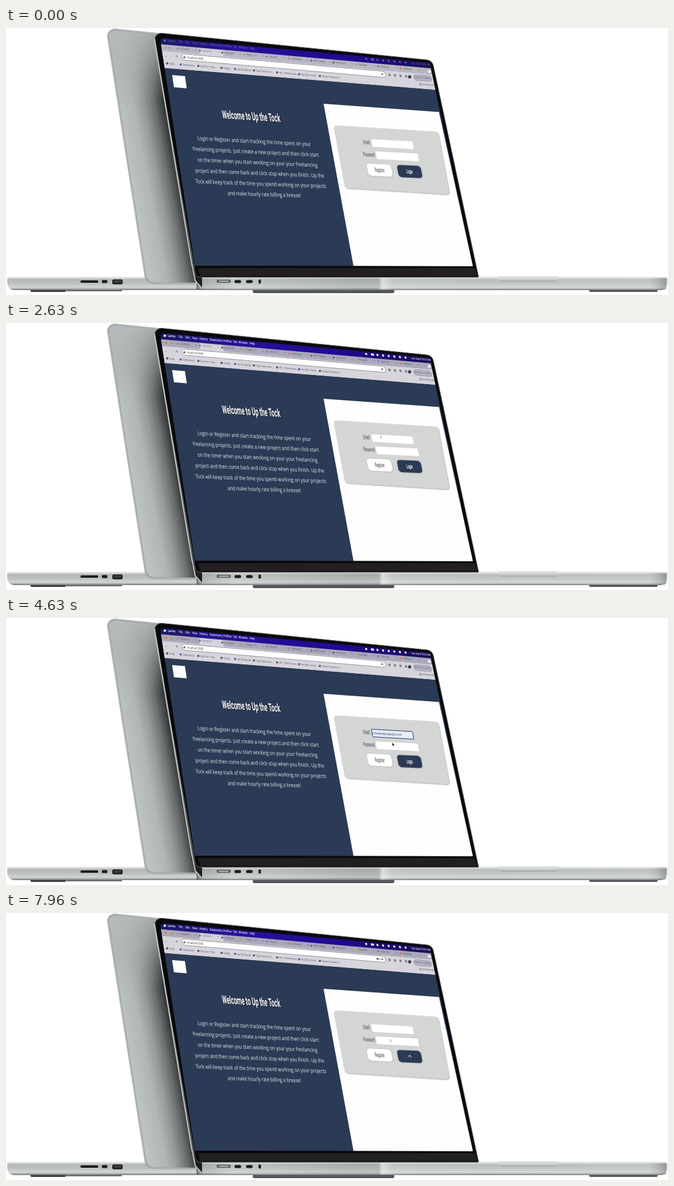
An HTML page with a canvas for the animation above (8000 ms loop, 1084 by 437 pixels).

```html
<!DOCTYPE html>
<html lang="en">
<head>
<meta charset="utf-8">
<title>Laptop login demo</title>
<style>
html, body { margin: 0; width: 100%; height: 100%; overflow: hidden; background: #fff; }
canvas { display: block; width: 1084px; height: 437px; }
</style>
</head>
<body>
<canvas id="stage" width="1084" height="437"></canvas>
<script>
const c = document.getElementById('stage').getContext('2d');
const LOOP = 8000;
const NAVY = '#2b3a55';
const SANS = '"Open Sans", "Noto Sans", sans-serif';
const HEAD = 'Roboto, "Liberation Sans", sans-serif';
const MAIL = 'tolvedev@example.com';

// Screen perspective: rows meet at a far point, columns lean with x.
const VX = 4450, VY = 402, SQUEEZE = 0.75;
const slope = (x, y) => (VY - y) / (VX - x);
const lean = x => 0.154 + (x - 300) * 0.00013;
const leftX = y => 252 + (y - 17) * 0.1535;
const rightX = y => 694 + (y - 58) * 0.2135;
const rowY = (row, x) => row + (VY - row) * (x - leftX(row)) / (VX - leftX(row));

function at(x, y, draw) {
  c.save();
  c.transform(1, slope(x, y), lean(x), 1, x, y);
  draw();
  c.restore();
}

function text(s, x, y, size, o = {}) {
  at(x, y, () => {
    c.scale(SQUEEZE * (o.narrow || 1), 1);
    c.font = `${o.weight || 400} ${size}px ${o.font || SANS}`;
    c.textAlign = o.align || 'left';
    c.textBaseline = 'middle';
    c.fillStyle = o.color || '#fff';
    c.fillText(s, 0, 0);
  });
}

function box(x, y, w, h, r, fill, stroke, line = 1) {
  at(x, y, () => {
    c.beginPath();
    c.roundRect(0, 0, w, h, r);
    if (fill) { c.fillStyle = fill; c.fill(); }
    if (stroke) {
      c.shadowColor = 'transparent';
      c.strokeStyle = stroke;
      c.lineWidth = line;
      c.stroke();
    }
  });
}

function dot(x, y, r, fill) {
  c.beginPath();
  c.arc(x, y, r, 0, 7);
  c.fillStyle = fill;
  c.fill();
}

function trace(points) {
  c.beginPath();
  points.forEach(([x, y]) => c.lineTo(x, y));
}

function poly(points, fill) {
  trace(points);
  c.closePath();
  c.fillStyle = fill;
  c.fill();
}

function line(points, color, width) {
  trace(points);
  c.strokeStyle = color;
  c.lineWidth = width;
  c.stroke();
}

function shadow(alpha, blur, offset) {
  c.shadowColor = `rgba(0,0,0,${alpha})`;
  c.shadowBlur = blur;
  c.shadowOffsetX = c.shadowOffsetY = offset;
}

// Closed outline with rounded corners; each point is [x, y, radius].
function rounded(points) {
  const n = points.length, [a, b] = [points[n - 1], points[0]];
  c.beginPath();
  c.moveTo((a[0] + b[0]) / 2, (a[1] + b[1]) / 2);
  points.forEach(([x, y, r], i) => {
    const q = points[(i + 1) % n];
    c.arcTo(x, y, (x + q[0]) / 2, (y + q[1]) / 2, r);
  });
  c.closePath();
}

function gradient(x0, y0, x1, y1, ...stops) {
  const g = c.createLinearGradient(x0, y0, x1, y1);
  stops.forEach(([p, color]) => g.addColorStop(p, color));
  return g;
}

function band(a, b, fill) {
  const ra = rowY(a, rightX(a + 38)), rb = rowY(b, rightX(b + 34));
  poly([[leftX(a), a], [rightX(ra), ra], [rightX(rb), rb], [leftX(b), b]], fill);
}

function slot(x, y, w, h, r = 1.5, fill = '#1c1d1e') {
  c.beginPath();
  c.roundRect(x, y, w, h, r);
  c.fillStyle = fill;
  c.fill();
}

function base(x0, x1, leftR, rightR) {
  c.beginPath();
  c.roundRect(x0, 407.5, x1 - x0, 21.5, [2, 2, rightR, leftR]);
  c.fillStyle = gradient(0, 407.5, 0, 429, [0, '#d4d7d7'], [0.07, '#e2e4e4'], [0.18, '#b3b7b8'],
    [0.5, '#bdc1c1'], [0.78, '#d3d6d5'], [0.9, '#a9adad'], [1, '#6b6e6e']);
  c.fill();
}

function backLaptop() {
  slot(40, 428, 58, 4, 2, '#3c3d3d');
  slot(98, 428, 92, 3, 1.5, '#6b6d6d');
  base(2, 325, 12, 0);
  slot(122, 413, 29, 4);
  slot(157, 412.5, 9, 5);
  slot(174, 411.5, 17, 8, 2.5);
  slot(176, 413, 13, 4, 1, '#3a3c3e');

  rounded([[165, 1, 11], [252, 10, 2], [322, 418, 4], [230, 417, 14]]);
  c.fillStyle = gradient(200, 220, 284, 204, [0, '#bdc2c3'], [0.3, '#b0b5b6'],
    [0.5, '#979b9c'], [0.7, '#6b6e6f'], [0.87, '#37393a'], [1, '#171818']);
  c.fill();
  c.fillStyle = gradient(215, 5, 238, 125, [0, 'rgba(181,186,187,.95)'], [0.4, 'rgba(176,181,182,.7)'],
    [1, 'rgba(170,175,176,0)']);
  c.fill();
  c.strokeStyle = '#858989';
  c.lineWidth = 2.5;
  c.stroke();
  c.strokeStyle = '#d3d6d6';
  c.lineWidth = 1;
  c.stroke();
}

function frontLaptop() {
  slot(404, 428, 232, 6, 3, '#55585a');
  slot(955, 428, 112, 4, 2, '#55585a');
  base(311, 1083, 8, 10);
  c.fillStyle = gradient(311, 0, 1083, 0, [0, 'rgba(20,20,20,.6)'], [0.015, 'rgba(110,112,112,.2)'],
    [0.08, 'rgba(225,228,228,.2)'], [0.34, 'rgba(120,123,122,.2)'], [0.385, 'rgba(120,123,122,.2)'],
    [0.395, 'rgba(255,255,255,.5)'], [0.42, 'rgba(235,237,236,.2)'], [0.6, 'rgba(235,237,236,.1)'],
    [0.96, 'rgba(230,232,231,.2)'], [1, 'rgba(90,92,92,.45)']);
  c.fillRect(312, 409, 769, 19);
  c.beginPath();
  c.roundRect(806, 406, 98, 9, [0, 0, 6, 6]);
  c.fillStyle = gradient(0, 407, 0, 415, [0, '#e2e4e4'], [0.7, '#c3c7c7'], [1, '#999d9d']);
  c.fill();
  slot(345, 412, 23, 5, 2, '#55585a');
  slot(348, 413.5, 17, 2, 1, '#b9bcbd');
  slot(374, 412.5, 11, 5, 2.5);
  slot(393, 412.5, 11, 5, 2.5);
  slot(413.5, 411.5, 4, 7, 2);

  poly([[303, 391], [309, 394], [321, 408], [321, 424], [313, 420]], '#1d1e1f');
  rounded([[241, 7, 11], [698, 53, 12], [774, 408, 1], [311, 408, 8]]);
  c.fillStyle = '#0a0a0b';
  c.fill();
  c.strokeStyle = '#6d7071';
  c.lineWidth = 1;
  c.stroke();
  poly([[314, 393], [768, 393], [772, 406], [318, 406]], '#211f1f');
  line([[243, 17], [304, 385], [310, 414], [319, 424]], '#c3c7c7', 2);
}

const MENUS = [['Lantra', 265], ['File', 283], ['Edit', 294], ['View', 305], ['History', 317],
  ['Bookmarks', 334], ['Profiles', 356], ['Tab', 372], ['Window', 381], ['Help', 399]];
const TABS = ['Creative B', 'Up The To', 'Local port', 'Page 2 - H', 'Server fil', 'Dashboard',
  'MVP_Design', 'Free fonts', 'Site build', 'Tutor stu', 'Database'];
const MARKS = [['Study', 263], ['Destinations', 285], ['My Drive - Files...', 314], ['Coding', 352],
  ['Job Site Boards', 374], ['Type Sheet Conv...', 405], ['API | Performance...', 443],
  ['Pay Bills Council', 479], ['Avatar Generator II', 513]];
const ICONS = ['#d36a55', '#5b56a8', '#4a4d57', '#cf9a4a', '#5878c9'];

function browser(active, key) {
  band(16, 27, gradient(252, 0, 695, 0, [0, '#1d1a68'], [0.3, '#26129a'], [0.65, '#1f0a94'], [1, '#191056']));
  c.globalAlpha = active ? 1 : 0.32;
  dot(260, rowY(20, 260), 2, '#fff');
  MENUS.forEach(([s, x], i) => text(s, x, rowY(20, x), 5, { weight: i ? 600 : 700 }));
  for (let i = 0; i < 8; i++) {
    const x = 588 + i * 9.2;
    box(x, rowY(20, x) - 1.7, i === 1 ? 5 : 3, 3.4, 1, '#fff');
  }
  text('Sun Sep 8 10:21 AM', 664, rowY(20.5, 664), 4.5, { weight: 600 });
  c.globalAlpha = 1;

  band(26.5, 38, active ? '#aaa8ba' : '#b7b6c2');
  ['#e2645c', '#e3b14c', '#60b35b'].forEach((color, i) =>
    dot(262 + i * 4.7, rowY(31.5, 262 + i * 4.7), 1.5, active ? color : '#a2a1ae'));
  box(316, rowY(27.5, 316), 39, 10.5, [3, 3, 0, 0], '#d6d4dd');
  TABS.forEach((s, i) => {
    const x = 281 + i * 36.5, y = rowY(31.5, x);
    dot(x, y, 1.5, ICONS[i % 5]);
    text(s, x + 4, y + 0.3, 4.4, { color: '#52525e' });
    text('×', x + 29, rowY(31.5, x + 29), 5, { color: '#555460' });
  });
  dot(693, 71, 2.6, '#ecebf0');

  band(37.5, 66, '#d6d5dc');
  ['←', '→', '⟳'].forEach((s, i) => text(s, 260 + i * 9, rowY(45, 260 + i * 9), 6, { color: i === 1 ? '#aaa' : '#555' }));
  box(287, rowY(39.5, 287), 334, 10, 5, '#fff', '#77767f', 0.7);
  dot(292, rowY(45, 292), 1.8, '#64646c');
  text('localhost:3000', 297, rowY(45.2, 297), 5.2, { color: '#333' });
  dot(616, rowY(45, 616), 1.4, '#66666e');
  if (key) {
    dot(608, rowY(45, 608), 1.4, '#44444c');
    box(609, rowY(44.6, 609), 3.5, 1, 0, '#44444c');
  }
  for (let i = 0; i < 4; i++) box(626 + i * 9, rowY(43, 626 + i * 9), 3.2, 4, 1, '#77767f');
  dot(661, rowY(45.5, 661), 2.6, '#353a44');
  box(667, rowY(40.5, 667), 29, 9.5, 4, '#b5b0c4', '#908a9f', 0.6);
  text('Relaunch to update', 669, rowY(45.2, 669), 3.7, { color: '#55505f' });
  MARKS.forEach(([s, x], i) => {
    dot(x + 1, rowY(57.5, x), 1.8, i % 3 === 1 ? '#564fb5' : '#4d4d57');
    text(s, x + 4.5, rowY(57.8, x + 4.5), 4.4, { color: '#4c4c56' });
  });
  text('All Bookmarks', 682, rowY(57.5, 682), 4.2, { color: '#4c4c56' });
  box(677, rowY(55.8, 677), 3, 3, 0.5, null, '#55555f', 0.6);
}

const COPY = [
  ['Login or Register and start tracking the time spent on your', 406.5],
  ['freelancing projects. Just create a new project and then click start', 409],
  ['on the timer when you start working on your your freelancing', 412],
  ['project and then come back and click stop when you finish. Up the', 415.5],
  ['Tock will keep track of the time you spend working on your projects', 417.5],
  ['and make hourly rate billing a breeze!', 423]
];

function page(t) {
  const filled = t >= 4260 && t < 7560;
  const preview = t >= 3460 && t < 4260;
  const menu = t >= 3030 && t < 4260;
  const mailFocus = t >= 2830 && t < 4760;
  const passFocus = t >= 5230 && t < 6660;
  const loginFocus = t >= 6660 && t < 7560;
  const typed = t < 7560 ? [5660, 5760, 5960, 6160].filter(k => t >= k).length : 0;

  band(65.5, 389, NAVY);
  poly([[520, 124], [709, 137.5], [764.5, 390], [569, 389.5]], '#fdfefd');
  poly([[742.5, 289], [745, 301], [745, 304], [741.8, 290]], '#d5d7d7');
  box(272, 77, 21, 20, 0, '#fff');

  shadow(0.55, 1, 1);
  text('Welcome to Up the Tock', 401.5, 145.5, 18.5, { weight: 700, font: HEAD, narrow: 0.63, align: 'center' });
  shadow(0, 0, 0);
  COPY.forEach(([s, x], i) => text(s, x, 186 + i * 17.4, 9.15, { align: 'center', color: '#e9ecf1' }));

  shadow(0.4, 2, 0.6);
  box(536.5, 159.5, 171, 102.5, 5, '#d4d6d5');
  shadow(0, 0, 0);

  const label = { font: HEAD, narrow: 0.56, weight: 500, color: '#5b5e62' };
  text('Email:', 585, 187, 10, label);
  text('Password:', 585, 207, 10, label);

  const pale = filled || preview;
  box(598, 182, 67.5, 12.5, 1, pale ? '#e6edfc' : '#fff', mailFocus ? '#24345f' : null, 0.9);
  if (pale) text(MAIL, 600, 188.8, preview ? 4 : 5.8, { color: '#3c4048' });
  box(605, 202, 69, 12.5, 1, '#fff', passFocus ? '#2b3c68' : null, 0.9);
  for (let i = 0; i < typed; i++) dot(608 + i * 1.9, 208.7, 0.75, '#222');
  if (passFocus && !typed) box(606.5, 205, 0.6, 7, 0, '#222');

  shadow(0.25, 2, 0.3);
  box(590, 221.5, 40, 20, 5, '#fff');
  box(639.5, 224, 39, 20, 5, NAVY, loginFocus ? '#8f9db9' : null);
  shadow(0, 0, 0);
  text('Register', 612, 233, 10, { ...label, align: 'center' });
  if (t < 7560) {
    text('Login', 661, 235.3, 9.5, { ...label, weight: 700, color: '#fff', align: 'center' });
  } else {
    const turn = Math.floor((t - 7560) / 100) * 0.9 - 1;
    c.beginPath();
    c.arc(661, 235, 2, turn, turn + 4.7);
    c.strokeStyle = '#e8ebf0';
    c.lineWidth = 1;
    c.stroke();
  }

  if (menu) {
    poly([[624, 200], [626.5, 196], [629, 200]], '#1b1c1f');
    box(624.5, 199, 38, 24, 2, '#1b1c1f');
    if (preview) box(625.5, 201.5, 36.5, 8.5, 1, '#35373b');
    text(MAIL, 627, 206, 4, { color: '#e4e5e7' });
    text('tolvedev.com', 628.5, 216.5, 4, { color: '#e4e5e7' });
  }
}

const PATH = [[160, 690, 298], [960, 606, 294], [1330, 583, 240], [1760, 586, 196], [2060, 612, 187],
  [3130, 614, 187], [3560, 632, 204], [4560, 632, 204], [4960, 629, 209], [8000, 629, 209]];

function pointer(t) {
  if (t < 160) return;
  const s = Math.floor((t + 40) / 100) * 100 - 40;
  const i = Math.max(1, PATH.findIndex(p => p[0] > s));
  const [t0, x0, y0] = PATH[i - 1], [t1, x1, y1] = PATH[i];
  const k = Math.max(0, Math.min(1, (s - t0) / (t1 - t0)));
  const e = k * k * (3 - 2 * k);
  const x = x0 + (x1 - x0) * e, y = y0 + (y1 - y0) * e;
  const beam = (s >= 1960 && s < 3260) || s >= 4860;
  if (beam) {
    box(x, y - 2.5, 0.7, 5, 0, '#555');
    return;
  }
  at(x, y, () => {
    trace([[0, 0], [0, 5], [1.2, 4], [2, 5.6], [2.8, 5.2], [2, 3.7], [3.3, 3.6]]);
    c.closePath();
    c.strokeStyle = '#fff';
    c.lineWidth = 0.8;
    c.stroke();
    c.fillStyle = '#111';
    c.fill();
  });
}

function screen(t) {
  c.save();
  rounded([[252, 16, 5], [694, 56, 5], [765, 390, 1], [309, 389, 1]]);
  c.clip();
  browser(t >= 2060, t >= 5560);
  page(t);
  pointer(t);
  c.restore();
}

function frame(now) {
  c.fillStyle = '#fff';
  c.fillRect(0, 0, 1084, 437);
  backLaptop();
  frontLaptop();
  screen(now % LOOP);
  requestAnimationFrame(frame);
}
requestAnimationFrame(frame);
</script>
</body>
</html>
```
